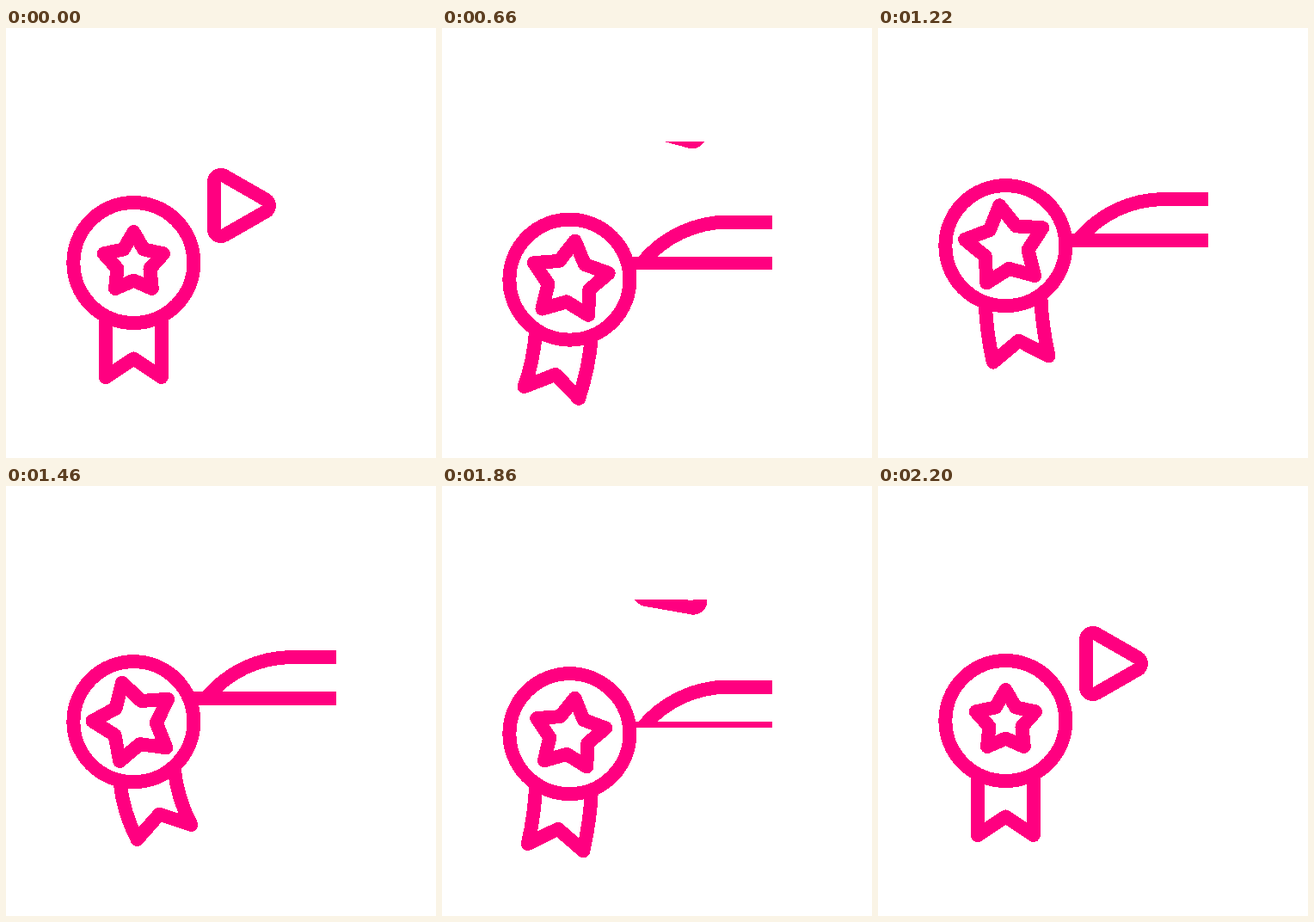
An HTML page for the animation above (2400 ms loop, 500 px wide and 500 px high).

```html
<!DOCTYPE html>
<html lang="en">
<head>
<meta charset="utf-8">
<title>Rosette and play</title>
<style>
  html, body { margin: 0; width: 100%; height: 100%; overflow: hidden; background: #fff; }
  svg { display: block; width: 100vw; height: 100vh; }
</style>
</head>
<body>
<svg viewBox="0 0 500 500" fill="none" stroke="#ff0080" stroke-width="16"
     stroke-linejoin="round" shape-rendering="crispEdges">
  <clipPath id="window"><rect x="200" y="132" width="184" height="149"/></clipPath>
  <g clip-path="url(#window)">
    <path id="play" d="M-24 -27.5V27.5L24 0Z" fill="#fff" stroke-width="32" paint-order="stroke"/>
    <path id="lines" d="M217 247H384M232.4 247A129.5 129.5 0 0 1 333 199H384"/>
  </g>
  <path id="ribbon"/>
  <circle id="ring" cx="148.4" r="70"/>
  <path id="star"/>
</svg>
<script>
const LOOP = 2400, STEP = 20, CX = 148.4;
const el = id => document.getElementById(id);
const [play, lines, ribbon, ring, star] = ['play', 'lines', 'ribbon', 'ring', 'star'].map(el);

const ease = u => u * u * (3 - 2 * u);

// Eased interpolation through values at the given times
function track(t, times, values) {
  if (t <= times[0]) return values[0];
  for (let i = 1; i < times.length; i++) {
    if (t < times[i]) {
      const u = (t - times[i - 1]) / (times[i] - times[i - 1]);
      return values[i - 1] + (values[i] - values[i - 1]) * ease(u);
    }
  }
  return values[values.length - 1];
}

// Offset (x, y) turned clockwise by deg around origin
function turn([ox, oy], x, y, deg) {
  const a = deg * Math.PI / 180, c = Math.cos(a), s = Math.sin(a);
  return [ox + x * c - y * s, oy + x * s + y * c];
}

const fmt = points => points.map(p => p.map(v => v.toFixed(2)).join(' '));

function starPath(center, radius, deg) {
  const points = Array.from({ length: 10 }, (_, i) =>
    turn(center, 0, -radius * (i % 2 ? 0.55 : 1), deg + i * 36));
  return 'M' + fmt(points).join('L') + 'Z';
}

// The hem turns further than the top, which bends the sides
function ribbonPath(center, sway, tilt) {
  const hem = turn(center, 0, 133, sway);
  const side = x => {
    const top = turn(center, x, 64, 1.5 * sway - 0.6 * tilt);
    return [top, turn(top, 0, 34, tilt * 0.35), turn(hem, x, 0, tilt)];
  };
  const [a, b, c, notch, d, e, f] =
    fmt([...side(-32.5), turn(hem, 0, -21.5, tilt), ...side(32.5).reverse()]);
  return `M${a}Q${b} ${c}L${notch}L${d}Q${e} ${f}`;
}

function draw(t) {
  const swing = [200, 750, 1500, 1900, 2200];
  const bob = track(t, [200, 700, 1200, 1700, 2200], [0, 20, -20, 20, 0]);
  const angle = track(t, swing, [0, 8.4, -16.4, 8.8, 0]);
  const sway = track(t, swing, [0, 9.8, -15.7, 7.7, 0]);
  const tilt = track(t, swing, [0, 13.3, -15.3, 8, 0]);
  const radius = track(t, [210, 815, 1540, 2200], [36.4, 48, 48, 36.4]);
  const shift = track(t, [184, 903, 1637, 2200], [0, 1, 1, 0]);

  const center = [CX, 273 + bob];
  ring.setAttribute('cy', center[1]);
  star.setAttribute('d', starPath([CX, center[1] + 0.6], radius, angle));
  ribbon.setAttribute('d', ribbonPath(center, sway, tilt));
  play.setAttribute('transform', `translate(274 ${206.5 - 135 * shift}) rotate(${61 * shift})`);
  lines.setAttribute('transform', `translate(0 ${100 * (1 - shift)})`);
}

const start = performance.now();
function tick() {
  const t = (performance.now() - start) % LOOP;
  draw(Math.floor(t / STEP) * STEP);
  requestAnimationFrame(tick);
}
draw(0);
requestAnimationFrame(tick);
</script>
</body>
</html>
```
